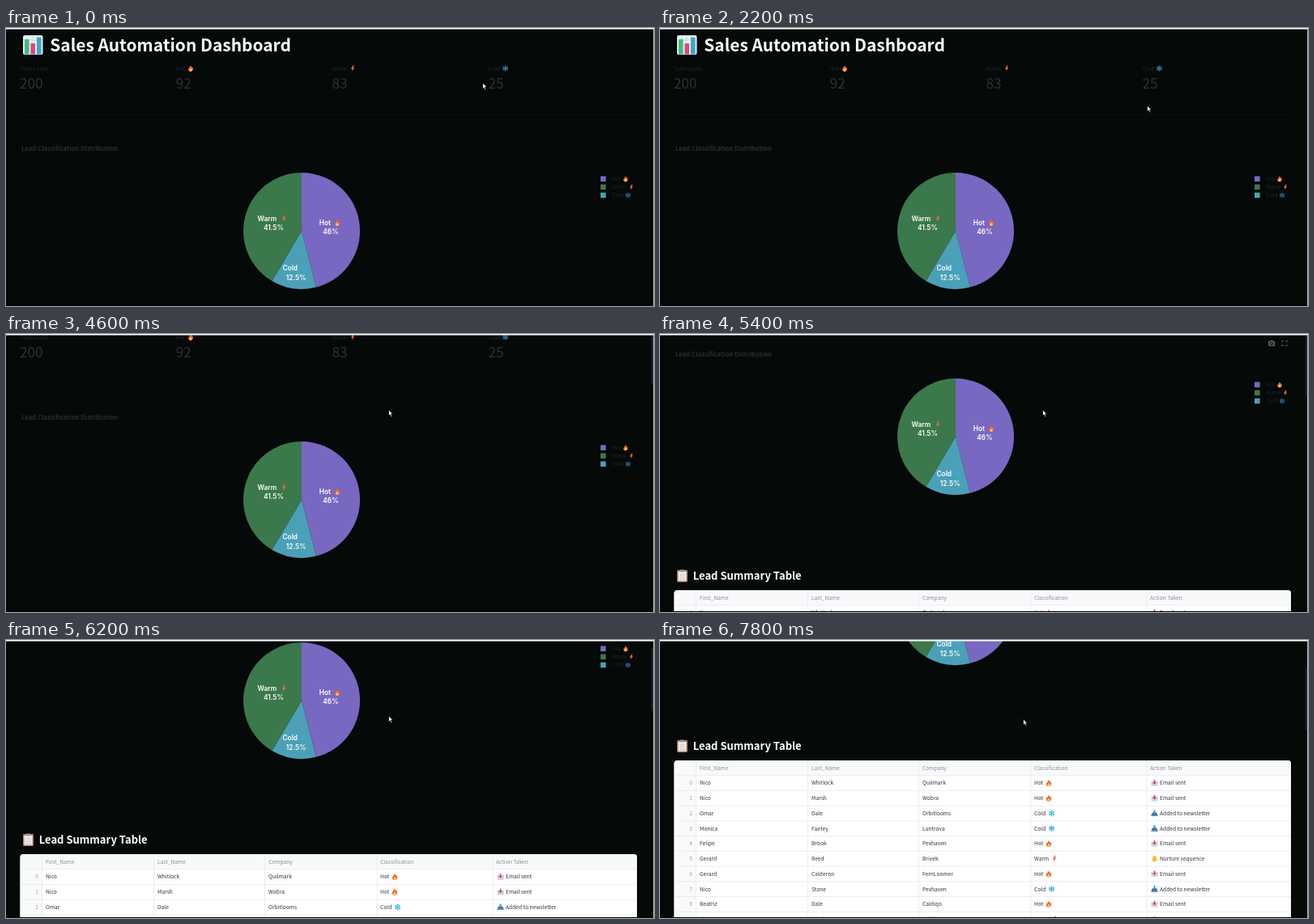
An HTML page with a canvas that plays this animation: 800 by 344 pixels, repeating every 8000 ms.

```html
<!DOCTYPE html>
<html lang="en">
<head>
<meta charset="utf-8">
<title>Sales Automation Dashboard</title>
<style>
html, body { margin: 0; width: 100%; height: 100%; overflow: hidden; background: #050908; }
canvas { display: block; width: 800px; height: 344px; }
</style>
</head>
<body>
<canvas id="stage" width="800" height="344"></canvas>
<script>
const ctx = document.getElementById('stage').getContext('2d');
const LOOP = 8000, STEP = 200, TAU = Math.PI * 2;
const SANS = '"Noto Sans CJK JP", "Noto Sans CJK SC", "Noto Sans CJK", "Open Sans", sans-serif';
const CHART = 'Inter, sans-serif';
const PURPLE = '#7868c1', GREEN = '#3b784b', TEAL = '#4ba0b8';

// Keyframes: time, value(s)
const scrollKeys = [[4200, 0], [4600, 46], [5400, 124], [6200, 176], [6800, 226], [7200, 292]];
const cursorKeys = [[1400, 588.5, 68], [2000, 601.5, 96], [2600, 601.5, 96],
  [3400, 472.5, 94], [7200, 472.5, 94], [7600, 448.5, 98]];

const rows = [
  ['Nico', 'Whitlock', 'Quilmark', 'Hot'],
  ['Nico', 'Marsh', 'Wobra', 'Hot'],
  ['Omar', 'Dale', 'Orbitlooms', 'Cold'],
  ['Monica', 'Fairley', 'Luntrova', 'Cold'],
  ['Felipe', 'Brook', 'Pexhaven', 'Hot'],
  ['Gerard', 'Reed', 'Brivek', 'Warm'],
  ['Gerard', 'Calderon', 'FernLoomer', 'Hot'],
  ['Nico', 'Stone', 'Pexhaven', 'Cold'],
  ['Beatriz', 'Dale', 'Caldiqo', 'Hot'],
  ['Elena', 'Reed', 'Orbitlooms', 'Warm']
];
const columns = [['First_Name', 49], ['Last_Name', 187], ['Company', 324],
  ['Classification', 462], ['Action Taken', 605]];
const classes = {
  Hot: { icon: fire, dx: 18, action: 'Email sent', mark: envelope },
  Warm: { icon: bolt, dx: 25, action: 'Nurture sequence', mark: bell },
  Cold: { icon: snow, dx: 21.5, action: 'Added to newsletter', mark: inbox }
};

function at(keys, t) {
  if (t <= keys[0][0]) return keys[0].slice(1);
  for (let i = 1; i < keys.length; i++) {
    const a = keys[i - 1], b = keys[i];
    if (t <= b[0]) {
      const k = (t - a[0]) / (b[0] - a[0]);
      return a.slice(1).map((v, j) => v + (b[j + 1] - v) * k);
    }
  }
  return keys[keys.length - 1].slice(1);
}

function text(str, x, y, size, color, weight = 400, family = SANS, align = 'left') {
  ctx.font = `${weight} ${size}px ${family}`;
  ctx.fillStyle = color;
  ctx.textAlign = align;
  ctx.fillText(str, x, y);
}

function box(x, y, w, h, color, r = 0) {
  ctx.fillStyle = color;
  ctx.beginPath();
  ctx.roundRect(x, y, w, h, r);
  ctx.fill();
}

function poly(color, ...pts) {
  ctx.fillStyle = color;
  ctx.beginPath();
  for (let i = 0; i < pts.length; i += 2) ctx.lineTo(pts[i], pts[i + 1]);
  ctx.closePath();
  ctx.fill();
}

function line(x1, y1, x2, y2, color, width = 1) {
  ctx.strokeStyle = color;
  ctx.lineWidth = width;
  ctx.beginPath();
  ctx.moveTo(x1, y1);
  ctx.lineTo(x2, y2);
  ctx.stroke();
}

// Draws in a unit space centred on x, y
function icon(x, y, size, draw) {
  ctx.save();
  ctx.translate(x, y);
  ctx.scale(size / 8, size / 8);
  draw();
  ctx.restore();
}

function flame(color, k, dy) {
  ctx.fillStyle = color;
  ctx.beginPath();
  ctx.moveTo(-0.6 * k, dy - 4 * k);
  ctx.bezierCurveTo(0.8 * k, dy - 3.2 * k, 1.4 * k, dy - 2 * k, 1.6 * k, dy - 1 * k);
  ctx.lineTo(2.3 * k, dy - 2 * k);
  ctx.bezierCurveTo(4 * k, dy + 0.8 * k, 3 * k, dy + 4 * k, 0, dy + 4 * k);
  ctx.bezierCurveTo(-3.4 * k, dy + 4 * k, -4 * k, dy + 0.6 * k, -2 * k, dy - 1.2 * k);
  ctx.bezierCurveTo(-0.6 * k, dy - 2.2 * k, -0.4 * k, dy - 3 * k, -0.6 * k, dy - 4 * k);
  ctx.fill();
}

function fire(x, y, size = 8) {
  icon(x, y, size, () => {
    flame('#ee6433', 1, 0);
    flame('#ffc65c', 0.55, 1.7);
  });
}

function bolt(x, y, size = 8) {
  icon(x, y, size, () => poly('#f4694a', 0.6, -4, -2.4, 0.5, -0.3, 0.5, -1.3, 4, 2.4, -0.9, 0.4, -0.9, 2, -4));
}

function snow(x, y, size = 8, color = '#35b2e6') {
  icon(x, y, size, () => {
    for (let i = 0; i < 6; i++) {
      line(0, 0, 0, -3.8, color, 0.9);
      line(-1.2, -3.2, 0, -2, color, 0.8);
      line(1.2, -3.2, 0, -2, color, 0.8);
      ctx.rotate(TAU / 6);
    }
  });
}

function envelope(x, y) {
  icon(x, y, 8, () => {
    box(-4, -2, 8, 5.6, '#cfd3e4', 0.6);
    line(-3.8, -1.6, 0, 1.5, '#a3a9c4', 0.6);
    line(3.8, -1.6, 0, 1.5, '#a3a9c4', 0.6);
    poly('#db3a62', -0.8, -4, 0.8, -4, 0.8, -1.2, 2.2, -1.2, 0, 1.4, -2.2, -1.2, -0.8, -1.2);
  });
}

function inbox(x, y) {
  icon(x, y, 8, () => {
    poly('#4b6580', -2.6, -0.5, 2.6, -0.5, 3.8, 1.7, 3.8, 3.6, -3.8, 3.6, -3.8, 1.7);
    box(-3.8, 1.8, 7.6, 1.8, '#6b8dab', 0.5);
    poly('#2395dc', -0.9, -4, 0.9, -4, 0.9, -1.2, 2.4, -1.2, 0, 1.8, -2.4, -1.2, -0.9, -1.2);
  });
}

function bell(x, y) {
  icon(x, y, 8, () => {
    ctx.fillStyle = '#f7bb35';
    ctx.beginPath();
    ctx.arc(0, -1, 2.5, Math.PI, 0);
    ctx.lineTo(2.8, 1.2);
    ctx.lineTo(3.8, 2.6);
    ctx.lineTo(-3.8, 2.6);
    ctx.lineTo(-2.8, 1.2);
    ctx.fill();
    box(-1, 2.6, 2, 1.2, '#d6902a', 0.6);
    box(-0.6, -4, 1.2, 1, '#f7bb35', 0.4);
  });
}

function barChart() {
  box(21, 9, 24.5, 24, '#e6eef0', 2);
  for (let i = 1; i < 4; i++) {
    line(21, 9 + i * 6, 45.5, 9 + i * 6, '#c3d4d9', 0.6);
    line(21 + i * 6, 9, 21 + i * 6, 33, '#c3d4d9', 0.6);
  }
  box(23, 14, 5.5, 18.5, '#3fbb7c', 0.6);
  box(30.5, 19, 5.5, 13.5, '#e0457c', 0.6);
  box(38, 11.5, 5.5, 21, '#38a9c8', 0.6);
}

function clipboard(x, y) {
  box(x, y, 13, 15, '#b5805a', 1.4);
  box(x + 1.6, y + 2, 9.8, 11.6, '#f3f4f6', 0.4);
  box(x + 3.6, y - 0.6, 5.8, 3, '#8e98a3', 0.8);
  for (let i = 0; i < 4; i++) line(x + 3, y + 5 + i * 2.2, x + 10, y + 5 + i * 2.2, '#aab3bd', 0.7);
}

function metrics() {
  [['Total Leads', 200], ['Hot', 92], ['Warm', 83], ['Cold', 25]].forEach(([label, value], i) => {
    const x = 17 + i * 192.8;
    text(label, x, 52.5, 6.65, '#25272f');
    text(value, x, 75.3, 17.1, '#2e303b');
  });
  fire(228, 50, 7.5);
  bolt(428, 50, 7.5);
  snow(616.5, 50, 7.5, '#2d88b4');
}

function slice(from, to, color) {
  ctx.fillStyle = color;
  ctx.beginPath();
  ctx.moveTo(365, 251);
  ctx.arc(365, 251, 72, from * TAU - TAU / 4, to * TAU - TAU / 4);
  ctx.fill();
}

function pie() {
  text('Lead Classification Distribution', 19, 152, 7.75, '#2a2c36', 700);
  slice(0, 0.46, PURPLE);
  slice(0.46, 0.585, TEAL);
  slice(0.585, 1, GREEN);
  const label = (str, x, y) => text(str, x, y, 8.3, '#fff', 600, CHART);
  label('Hot', 386.8, 244);
  label('46%', 391.3, 255);
  fire(409, 241, 8);
  label('Warm', 310.5, 239);
  label('41.5%', 318, 250);
  bolt(343, 236, 8);
  label('Cold', 341.5, 300.3);
  label('12.5%', 345.8, 311.5);
  snow(367.5, 297.5, 7.5, '#42a8d2');
  [['Hot', PURPLE], ['Warm', GREEN], ['Cold', TEAL]].forEach(([name, color], i) => {
    const y = 186.7 + i * 10.1;
    box(734, y - 3.3, 6.6, 6.6, color);
    text(name, 748, y + 2.4, 6.6, '#20232b', 400, CHART);
  });
  fire(765, 186.7, 7);
  bolt(772, 197, 7);
  snow(768, 207, 7, '#2c6c94');
}

function toolbar() {
  const color = '#555861', y = 135.5;
  box(751, y - 2.7, 8, 6.2, color, 1);
  box(753.3, y - 3.7, 3.4, 2, color, 0.5);
  ctx.strokeStyle = '#050908';
  ctx.lineWidth = 0.9;
  ctx.beginPath();
  ctx.arc(755, y + 0.4, 1.6, 0, TAU);
  ctx.stroke();
  icon(771, y, 8, () => {
    for (let i = 0; i < 4; i++) {
      line(-3.4, -3, -1, -3, color, 0.9);
      line(-3, -3.4, -3, -1, color, 0.9);
      ctx.rotate(TAU / 4);
    }
  });
}

function table() {
  const top = 441, h = 18.72, left = 17.5, right = 779, bottom = top + h * 11;
  clipboard(21, 416);
  text('Lead Summary Table', 40.7, 428.2, 13, '#fff', 600);
  box(left, top, right - left, bottom - top, '#fff', 4);
  box(left, top, right - left, h, '#f8f9fb', [4, 4, 0, 0]);
  box(left, top + h, 27, bottom - top - h, '#f9fafb');
  for (const x of [44.5, 182.5, 319.5, 458, 601]) line(x, top, x, bottom, '#e8e9ed', 0.8);
  for (let i = 1; i < 11; i++) line(left, top + i * h, right, top + i * h, '#e8e9ed', 0.8);
  for (const [name, x] of columns) text(name, x, top + 11.7, 6.65, '#8b8d96');
  rows.forEach((row, i) => {
    const mid = top + h * (i + 1.5), y = mid + 2.4, kind = classes[row[3]];
    text(i, 40, y, 6.65, '#9b9da5', 400, SANS, 'right');
    row.forEach((cell, j) => text(cell, columns[j][1], y, 6.65, '#31333f'));
    kind.icon(462 + kind.dx, mid, 8);
    kind.mark(610.5, mid);
    text(kind.action, 617, y, 6.65, '#31333f');
  });
}

function cursor(x, y) {
  ctx.save();
  ctx.translate(x, y);
  ctx.strokeStyle = '#15171a';
  ctx.lineWidth = 0.8;
  poly('#fff', 0, 0, 0, 7.2, 1.6, 5.8, 2.8, 8.4, 4, 7.9, 2.9, 5.3, 5, 5.1);
  ctx.stroke();
  ctx.restore();
}

function draw(t) {
  const [scroll] = at(scrollKeys, t);
  box(0, 0, 800, 344, '#050908');
  ctx.save();
  ctx.translate(0, -scroll);
  barChart();
  text('Sales Automation Dashboard', 54.3, 29, 20.9, '#fff', 700);
  metrics();
  line(17, 107.5, 783, 107.5, '#0d1013');
  pie();
  if (t >= 4800) toolbar();
  line(17, 391, 783, 391, '#0d1013');
  table();
  ctx.restore();

  if (t >= 3400) {
    const end = 52 + scroll * 0.205, start = Math.max(2, end - 78);
    box(796.5, start, 2.5, end - start, '#191c24', 1);
  }
  box(0, 343, 800, 1, '#000');
  box(0, 0, 800, 1.6, '#fff');
  box(799.2, 0, 0.8, 344, '#d8dada');
  cursor(...at(cursorKeys, t));
}

function frame() {
  const t = performance.now() % LOOP;
  draw(Math.floor(t / STEP) * STEP);
  requestAnimationFrame(frame);
}
frame();
</script>
</body>
</html>
```
